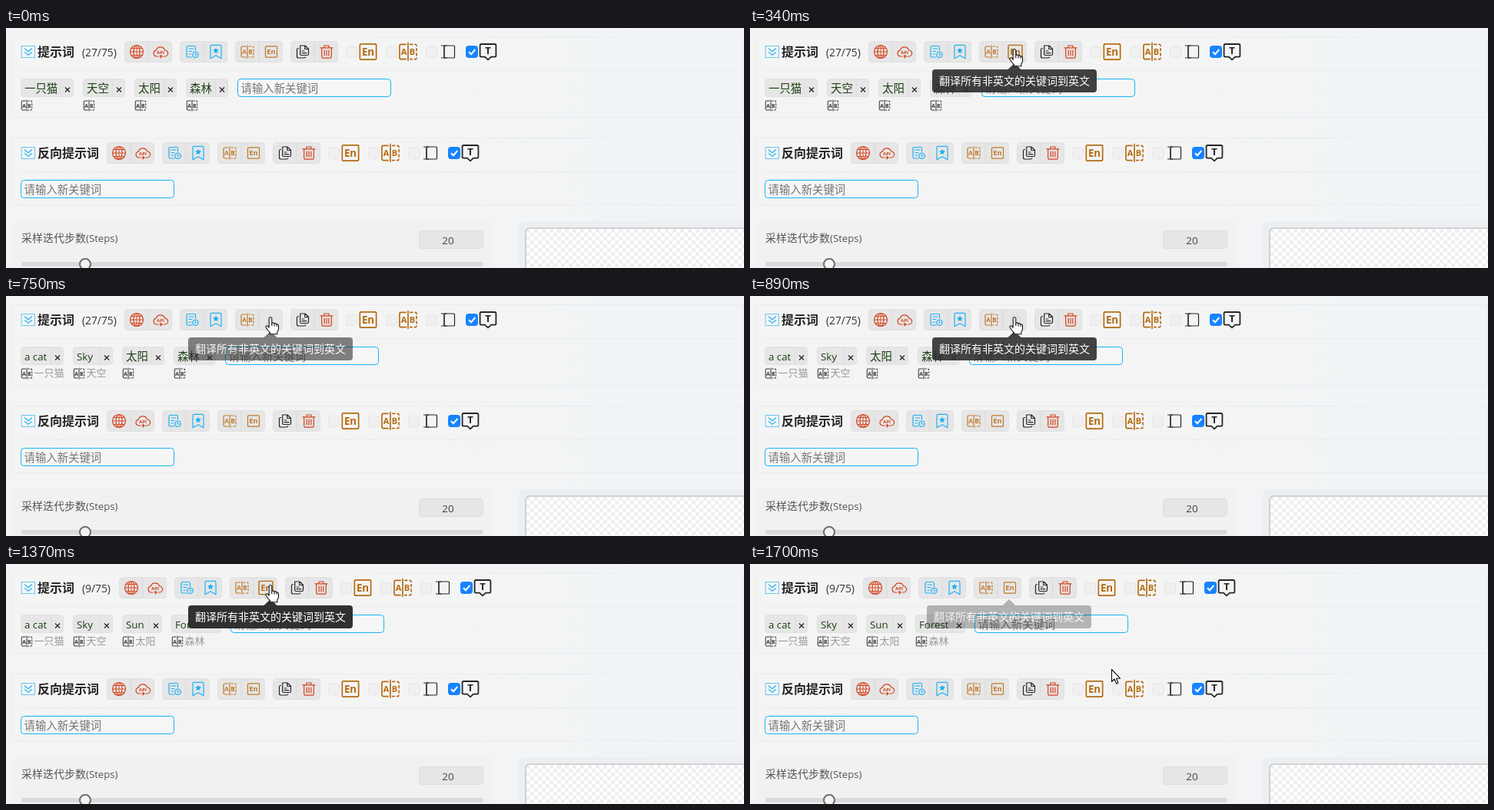
An HTML page for the animation above (1.77 s loop, 960 by 313 pixels).

```html
<!DOCTYPE html>
<html lang="zh-CN">
<head>
<meta charset="utf-8">
<title>提示词</title>
<style>
  html, body { margin: 0; width: 100%; height: 100%; overflow: hidden; background: #f4f4f4; }
  svg { display: block; width: 960px; height: 313px; }
  text { font-family: "Open Sans", "Noto Sans CJK SC", "Noto Sans CJK JP", "Noto Sans CJK", sans-serif; white-space: pre; }
  .icon { fill: none; stroke: currentColor; stroke-width: 1.2; stroke-linecap: round; stroke-linejoin: round; }
  .icon text, .icon .solid { fill: currentColor; stroke: none; }
  .icon text { font-weight: 700; text-anchor: middle; }
</style>
</head>
<body>
<svg id="stage" viewBox="0 0 960 313" xmlns="http://www.w3.org/2000/svg"></svg>
<script>
const LOOP = 1770;
const RED = '#d4421c', BLUE = '#1fb0f5', OCHRE = '#bf7a2a', BROWN = '#b36b12', DARK = '#262626';
const stage = document.getElementById('stage');

// Start time of every step: 70 ms apart, with a few shorter ones
const shortSteps = [4, 9, 19, 21, 23];
const starts = [0];
for (let k = 1; k < 26; k++) starts.push(starts[k - 1] + (shortSteps.includes(k) ? 60 : 70));

const ICONS = {
  fold: `<rect x="-8.5" y="-7.5" width="17" height="15" stroke-opacity=".65" stroke-width="1"/>
    <path d="M-4.5 -4L0 -.3L4.5 -4M-4.5 .7L0 4.4L4.5 .7"/>`,
  globe: `<circle r="8.5"/><ellipse rx="4" ry="8.5"/><path d="M0 -8.5V8.5M-8.5 0H8.5M-7.2 -4.5H7.2M-7.2 4.5H7.2" stroke-width=".9"/>`,
  api: `<path d="M-3 6H-5.2A4 4 0 0 1 -5.8 -1.9A6 6 0 0 1 5.6 -2.2A4.1 4.1 0 0 1 5.4 6H4M-1 6H2M0 4.4L2 6L0 7.8"/>
    <text y="3" font-size="6">API</text>`,
  history: `<path d="M0 7H-5.5Q-7 7 -7 5.5V-6Q-7 -7.5 -5.5 -7.5H3Q4.5 -7.5 4.5 -6V-2M-4 -4H1.8M-4 -.5H0M-4 3H-1.5"/>
    <circle cx="4.5" cy="3.7" r="3.7"/><path d="M4.3 1.8V4H6"/>`,
  mark: `<path d="M-7 8.8V-7Q-7 -8.7 -5.3 -8.7H5.3Q7 -8.7 7 -7V8.8L0 4.8Z"/>
    <path class="solid" d="M0 -5.5L1.2 -2.9L4 -2.6L1.9 -.7L2.5 2.1L0 .7L-2.5 2.1L-1.9 -.7L-4 -2.6L-1.2 -2.9Z"/>`,
  ab: `<path d="M-2 -7H-6.5Q-8 -7 -8 -5.5V5.5Q-8 7 -6.5 7H-2M0 -8.2V8.2"/>
    <path d="M2 -7H6.5Q8 -7 8 -5.5V5.5Q8 7 6.5 7H2" stroke-dasharray="2.2 2.4"/>
    <text x="-4" y="3" font-size="8">A</text><text x="4" y="3" font-size="8">B</text>`,
  en: `<rect x="-7.5" y="-7.2" width="15" height="14.4" rx="1"/><text y="3.4" font-size="9.4">En</text>`,
  copy: `<path d="M-3 -8H3L7.5 -3.7V3Q7.5 4.5 6 4.5H-1.8Q-3.3 4.5 -3.3 3V-8ZM2.8 -8V-3.5H7.5"/>
    <path d="M-5.5 -4.5Q-7.5 -4.5 -7.5 -3V6Q-7.5 8 -5.5 8H2Q3.7 8 3.7 6.8M-.8 -1H2M-.8 1.7H4.8"/>`,
  trash: `<path d="M-8 -5.2H8M-3 -5.2V-8H3V-5.2M-6.3 -5.2V6.5Q-6.3 8.2 -4.6 8.2H4.6Q6.3 8.2 6.3 6.5V-5.2M-2.8 -2V5M0 -2V5M2.8 -2V5"/>`,
  field: `<rect x="-5" y="-8" width="13.5" height="16" rx="1"/><path d="M-8.5 -8H-2M-8.5 8H-2M-5 -8V8"/>`,
  bubble: `<path d="M-8.8 -10H8.8Q10.4 -10 10.4 -8.4V5Q10.4 6.6 8.8 6.6H4L0 10.4L-4 6.6H-8.8Q-10.4 6.6 -10.4 5V-8.4Q-10.4 -10 -8.8 -10Z" stroke-width="1.8"/>
    <text y="3.2" font-size="13">T</text>`
};

function icon(name, x, y, color, scale = 1) {
  return `<g class="icon" color="${color}" transform="translate(${x} ${y}) scale(${scale})">${ICONS[name]}</g>`;
}

function rect(x, y, w, h, r, attrs) {
  return `<rect x="${x}" y="${y}" width="${w}" height="${h}" rx="${r}" ${attrs}/>`;
}

function label(str, x, y, size, color, attrs = '') {
  return `<text x="${x}" y="${y}" font-size="${size}" fill="${color}" ${attrs}>${str}</text>`;
}

function buttonPair(x, left, right) {
  return rect(x + .5, 17.5, 61, 27, 4, 'fill="#e6e6e6" stroke="#e0e0e0"') +
    `<path d="M${x + 31} 18V44" stroke="#dadada"/>` +
    icon(left[0], x + 16, 31, left[1]) +
    (right ? icon(right[0], x + 47, 31, right[1]) : '');
}

function checkbox(x, on) {
  if (!on) return rect(x + .5, 24.5, 14, 14, 3, 'fill="#f0f0f0" stroke="#e5e5e5"');
  return rect(x, 23, 16, 16, 4, 'fill="#1783ff"') +
    `<path d="M${x + 4} 31.2L${x + 7} 34.2L${x + 12.3} 28" fill="none" stroke="#fff" stroke-width="2"/>`;
}

// Toolbar in the coordinates of the upper row; the "En" button can be left out
function toolbar(withEn) {
  return buttonPair(154, ['globe', RED], ['api', RED]) +
    buttonPair(226, ['history', BLUE], ['mark', BLUE]) +
    buttonPair(298, ['ab', OCHRE], withEn && ['en', OCHRE]) +
    buttonPair(370, ['copy', DARK], ['trash', RED]) +
    checkbox(442) + icon('en', 471, 31, BROWN, 1.42) +
    checkbox(494) + icon('ab', 523, 31, BROWN, 1.38) +
    checkbox(546) + icon('field', 575, 31, DARK) +
    checkbox(598, true) + icon('bubble', 627, 31, DARK);
}

function panel(y, h, title) {
  return rect(8.5, y + .5, 950, h, 0, 'fill="none" stroke="#e9ecee"') +
    `<path d="M19 ${y + 44.5}H948" stroke="#e4e6e7" stroke-dasharray="3 2"/>` +
    icon('fold', 29, y + 20, BLUE) +
    label(title, 41, y + 26, 16, '#222', 'font-weight="700"');
}

function inputBox(x, y) {
  return rect(x + .5, y + .5, 199, 23, 4, 'fill="#f6f6f6" stroke="#18b3f5"') +
    label('请输入新关键词', x + 4.5, y + 18, 14.4, '#757575');
}

const WORDS = [
  { zh: '一只猫', en: 'a cat', zw: 69, ew: 56, from: 10 },
  { zh: '天空', en: 'Sky', zw: 55, ew: 52, from: 11 },
  { zh: '太阳', en: 'Sun', zw: 55, ew: 52, from: 15 },
  { zh: '森林', en: 'Forest', zw: 55, ew: 65, from: 18 }
];

function tags(k) {
  let x = 19, out = '';
  for (const w of WORDS) {
    const done = k >= w.from, width = done ? w.ew : w.zw, right = x + width;
    out += rect(x + .5, 66.5, width - 1, 23, 4, 'fill="#e6e6e6" stroke="#e0e0e0"') +
      `<path d="M${right - 16.5} 67V89" stroke="#dcdcdc"/>` +
      `<path d="M${right - 11} 77.5l6 6m0 -6l-6 6" stroke="#222" stroke-width="1.2"/>` +
      label(done ? w.en : w.zh, x + 5, 84, done ? 13.3 : 14.4, '#1b3f12') +
      icon('ab', x + 8, 101, '#333', .84);
    if (done) out += label(w.zh, x + 17.5, 105, 13, '#999');
    x = right + 12;
  }
  return out + inputBox(x, 66);
}

stage.innerHTML = `
  <defs>
    <linearGradient id="bg"><stop offset=".5" stop-color="#f4f4f4"/><stop offset="1" stop-color="#f0f4f7"/></linearGradient>
    <pattern id="checks" width="10" height="10" x="677" y="262" patternUnits="userSpaceOnUse">
      <rect width="10" height="10" fill="#fff"/><path d="M0 0H5V10H10V5H0Z" fill="#efefef"/>
    </pattern>
  </defs>
  <rect width="960" height="313" fill="url(#bg)"/>
  ${panel(11, 105, '提示词')}
  <text id="count" x="99" y="36.5" font-size="13.8" fill="#333"></text>
  <g id="bar">${toolbar(false)}<g id="en"></g><g id="spin">
    <circle r="6.5" fill="none" stroke="#d98a80" stroke-width="1.3" stroke-dasharray="30 11"/></g></g>
  <g id="tags"></g>
  ${panel(143, 87, '反向提示词')}
  <g transform="translate(-23 132)">${toolbar(true)}</g>
  ${inputBox(19, 198)}
  ${rect(8, 252, 625, 80, 8, 'fill="#eff1f3"')}
  ${label('采样迭代步数<tspan font-size="13.2">(Steps)</tspan>', 20, 279, 14, '#555')}
  ${rect(537.5, 264.5, 83, 23, 4, 'fill="#e6e6e6" stroke="#dcdcdc"')}
  ${label('20', 575, 282, 13.5, '#444', 'text-anchor="middle"')}
  ${rect(20, 305, 601, 6, 3, 'fill="#d9d9d9"')}
  <circle cx="103" cy="308" r="7" fill="#f4f4f4" stroke="#6e6e6e" stroke-width="2"/>
  ${rect(667, 252, 310, 80, 8, 'fill="#eceff2"')}
  ${rect(676, 261, 310, 80, 5, 'fill="url(#checks)" stroke="#d0d2d4" stroke-width="2"')}
  <g id="tip">
    <path d="M241 54H335.5L344 46L352.5 54H447Q451 54 451 58V80Q451 84 447 84H241Q237 84 237 80V58Q237 54 241 54Z" fill="#303030"/>
    ${label('翻译所有非英文的关键词到英文', 246, 74.3, 14, '#fff')}
  </g>
  <circle id="click" cx="343" cy="29" r="13" fill="#f3e52c" opacity=".78"/>
  <g id="cursor" stroke="#111" stroke-width="1.1" stroke-linejoin="round" fill="#fff">
    <path id="arrow" d="M.5 .5V16.5L4 13L6.6 19L9 18L6.5 12.2H11.5Z"/>
    <path id="hand" d="M-1.8 1.8Q0 -.8 1.8 1.8V8.5Q3.5 7 5 9Q6.8 8 8 10Q10.4 9.4 10.5 12V16Q10.4 18 8.8 20V22.7H-.5V20.8Q-3 18.5 -6 14Q-6.2 11.2 -3.8 12L-1.8 14ZM1.8 8.5V12M5 9V12.4M8 10V12.8"/>
  </g>`;

const $ = id => document.getElementById(id);
const show = (id, on) => $(id).setAttribute('display', on ? 'inline' : 'none');
const move = (id, x, y, more = '') => $(id).setAttribute('transform', `translate(${x} ${y}) ${more}`);

// Linear interpolation through [step, value] keys
function track(keys, k) {
  let i = 1;
  while (i < keys.length - 1 && k > keys[i][0]) i++;
  const [a, va] = keys[i - 1], [b, vb] = keys[i];
  const p = Math.min(1, Math.max(0, (k - a) / (b - a)));
  return va + (vb - va) * p;
}

const cursorX = [[1, 168], [2, 246], [3, 318], [4, 344], [22, 344], [23, 350], [24, 423], [25, 470]];
const cursorY = [[1, 60], [2, 48], [3, 36], [4, 27], [22, 27], [23, 32], [24, 103], [25, 137]];
const tipAlpha = [[3, 0], [4, .45], [5, .92], [7, .92], [9, .51], [10, .45], [11, .6], [12, .8], [14, 1], [23, 1], [24, .7], [25, .33]];

let last = -1;
function draw(t) {
  let k = starts.length - 1;
  while (starts[k] > t) k--;
  if (k === last) return;
  last = k;

  const busy = k >= 10 && k < 20;
  const hover = k >= 4 && k < 8 || k >= 20 && k < 24;
  $('count').textContent = k < 20 ? '(27/75)' : '(9/75)';
  move('bar', k < 20 ? 0 : -7, 0);
  $('tags').innerHTML = tags(k);

  show('en', !busy);
  $('en').innerHTML = icon('en', 345, 31, hover ? BROWN : OCHRE, hover ? 1.2 : 1);
  show('spin', busy);
  move('spin', 345, 31, `rotate(${k * 67})`);
  $('spin').setAttribute('opacity', track([[11, .05], [17, .35]], k));

  move('tip', k < 21 ? 0 : -7, 0);
  $('tip').setAttribute('opacity', track(tipAlpha, k));
  show('click', k >= 7 && k < 10);

  const hand = k >= 4 && k < 24;
  show('cursor', k > 0);
  show('hand', hand);
  show('arrow', !hand);
  move('cursor', track(cursorX, k), track(cursorY, k));
}

const begin = performance.now();
function tick() {
  draw((performance.now() - begin) % LOOP);
  requestAnimationFrame(tick);
}
tick();
</script>
</body>
</html>
```
